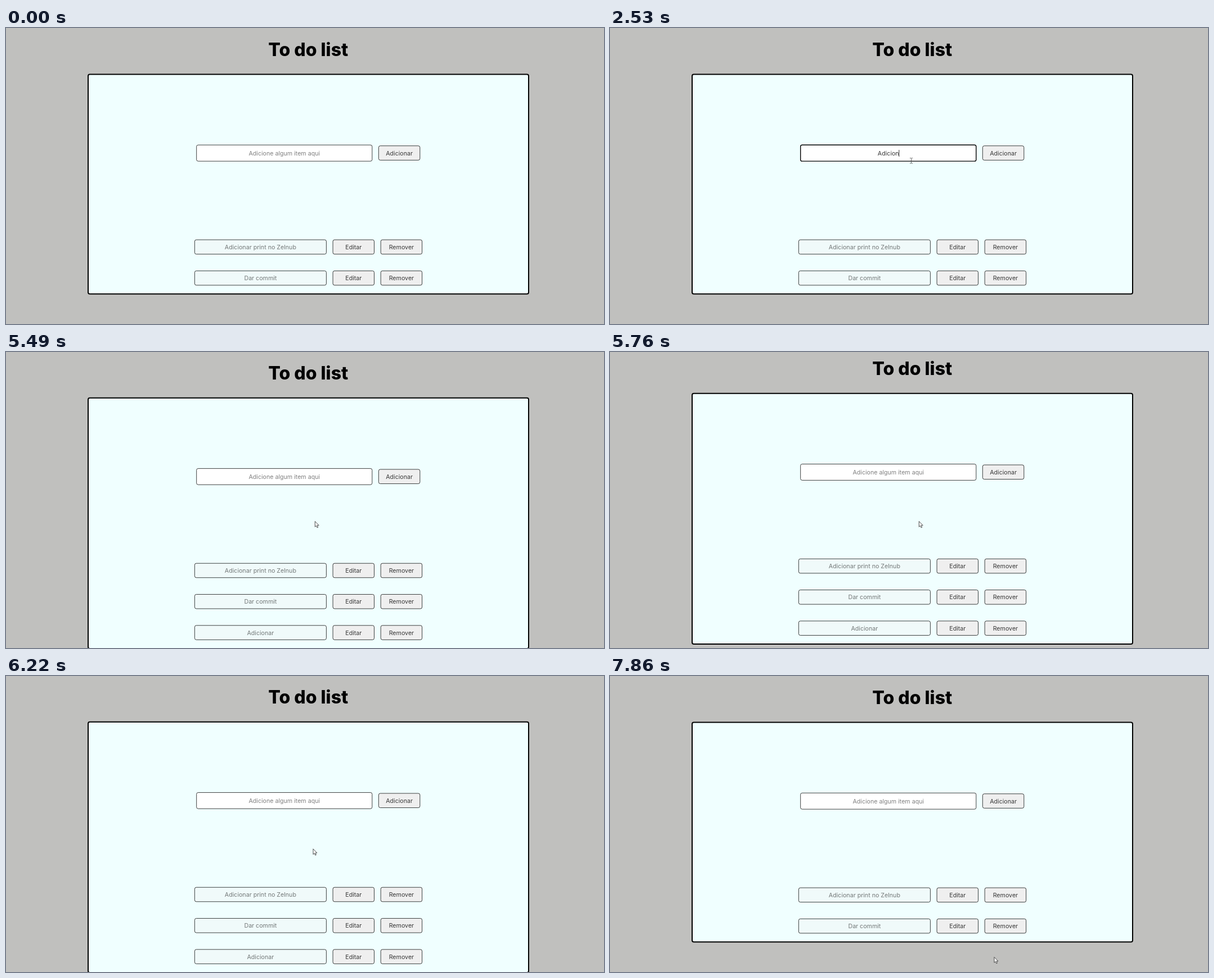
Recreate the animation shown at these times as an HTML page. Size 1063 px wide and 527 px high, loop 8000 ms.

```html
<!DOCTYPE html>
<html lang="pt">
<head>
<meta charset="utf-8">
<title>To do list</title>
<style>
  html, body { margin: 0; width: 100%; height: 100%; overflow: hidden; background: #c0c0be; }
  svg { display: block; width: 100%; height: 100%; }
  text { font: 10.67px Inter, "Open Sans", sans-serif; text-anchor: middle; fill: #383838; }
  #title { font-size: 32px; font-weight: 800; fill: #000; }
  rect { stroke: #000; stroke-width: .75; }
  .panel rect { fill: #f0ffff; stroke-width: 2; }
  .button rect { fill: #efefef; }
  .button.hover rect { fill: #d3d3d3; }
  .item rect { fill: #f0fafa; }
  .item text { fill: #737878; }
  .field rect { fill: #fff; }
  .field.focus rect { stroke-width: 1.4; }
  .field.empty text { fill: #808080; }
</style>
</head>
<body>
<svg>
  <g id="page"><text id="title" x="537.3" y="50">To do list</text></g>
  <g id="pointer">
    <circle id="click" r="9" fill="#f0e628" fill-opacity=".75"/>
    <g fill="#fff" stroke="#222" stroke-width=".8" stroke-linejoin="round">
      <path id="arrow" d="M.3 .5V10.3L2.5 8.3L4.1 11.8L5.7 11.1L4.2 7.7H7.2Z"/>
      <g id="hand">
        <path d="M-1.2 1.6C-1.2 .1 1.1 .1 1.1 1.6V5L5.2 5.9Q6.8 6.4 6.4 8.2L5.4 11.3V13.7H-1V12L-4.4 8.6Q-4.9 6.8 -3 7.1L-1.2 8.5Z"/>
        <path d="M1.1 5V7M3.2 5.6V7.2M5.1 6V7.6" fill="none" stroke-width=".7"/>
      </g>
      <path id="beam" fill="none" stroke="#444" d="M-2.5 -4.5H-1L0 -3.9L1 -4.5H2.5M0 -3.9V4.4M-2.5 5H-1L0 4.4L1 5H2.5"/>
    </g>
  </g>
</svg>
<script>
const LOOP = 8000, PITCH = 55.3;
const $ = id => document.getElementById(id);
const page = $("page");

function add(parent, tag, attrs) {
  const el = document.createElementNS("http://www.w3.org/2000/svg", tag);
  for (const k in attrs) el.setAttribute(k, attrs[k]);
  parent.append(el);
  return el;
}

// bordered box with centred text; the border lies inside x, y, w, h
function box(kind, x, y, w, h, text = "", line = .75) {
  const el = add(page, "g", { class: kind });
  const rect = add(el, "rect", { x: x + line / 2, y: y + line / 2, width: w - line, height: h - line, rx: 3 });
  const label = add(el, "text", { x: x + w / 2, y: y + h / 2 + 4 });
  label.textContent = text;
  return { el, rect, label };
}

const buttons = [];
function button(x, y, text, row = 0) {
  buttons.push({ el: box("button", x, y, 74.2, 26.3, text).el, x, y, row });
}

const panel = box("panel", 145, 81.5, 785, 393, "", 2);
const field = box("field", 338.3, 207.9, 312.9, 29.6);
const caret = add(field.el, "path", { d: "M0 217V229", stroke: "#000", "stroke-width": .8 });
button(662, 209.4, "Adicionar");

const items = ["Adicionar print no Zelnub", "Dar commit", "Adicionar"].map((text, i) => {
  const y = 376.7 + PITCH * i;
  button(580.7, y, "Editar", i);
  button(665.8, y, "Remover", i);
  return box("item", 335, y, 234.8, 26.3, text).el;
});

// pointer path: time, x, y
const path = [
  [240, 924, 516], [740, 535.5, 236], [3100, 535.5, 236], [3930, 678, 231],
  [4560, 678, 231], [4710, 549, 301], [6200, 549, 301], [6320, 530, 337],
  [6440, 498, 385], [6650, 525, 455], [6920, 613, 492], [7120, 660, 497], [7420, 682.7, 500]
];
const word = "Adicionar";
const keys = [1620, 1710, 1910, 2080, 2220, 2380, 2530, 2700, 2760];

const within = (t, a, b) => t >= a && t < b;
const ease = (t, a, b) => {
  const p = Math.min(1, Math.max(0, (t - a) / (b - a)));
  return p * p * (3 - 2 * p);
};
const show = (el, on) => el.setAttribute("visibility", on ? "visible" : "hidden");

function position(t) {
  let i = 0;
  while (i < path.length - 2 && t >= path[i + 1][0]) i++;
  const [a, x, y] = path[i], [b, u, v] = path[i + 1];
  // the last stretch flows through its points without stopping
  const p = a < 6200 ? ease(t, a, b) : Math.min(1, (t - a) / (b - a));
  return [x + (u - x) * p, y + (v - y) * p];
}

function drawField(t) {
  const typed = t < 4170 ? word.slice(0, keys.filter(k => k <= t).length) : "";
  const focus = within(t, 1260, 3980);
  field.label.textContent = typed || "Adicione algum item aqui";
  field.el.classList.toggle("empty", !typed);
  field.el.classList.toggle("focus", focus);
  show(caret, focus && !within(t, 2960, 3460) && t < 3930);
  const half = typed ? field.label.getComputedTextLength() / 2 : 0;
  caret.setAttribute("transform", `translate(${494.9 + half})`);
}

function draw(t) {
  const third = within(t, 4170, 7780);
  const scroll = 10 * (ease(t, 5410, 5860) - ease(t, 5900, 6290));
  page.setAttribute("transform", `translate(0 ${-scroll})`);
  panel.rect.setAttribute("height", 391 + (third ? PITCH : 0));
  show(items[2], third);
  drawField(t);

  const [x, y] = position(t);
  const on = t >= 240;
  const over = (l, top, w, h) => on && within(x, l, l + w) && within(y + scroll, top, top + h);
  let hand = false;
  for (const b of buttons) {
    const there = b.row < 2 || third;
    const hover = there && over(b.x, b.y, 74.2, 26.3);
    show(b.el, there);
    b.el.classList.toggle("hover", hover);
    hand = hand || hover;
  }
  const beam = over(338, 208, 313, 30);
  show($("hand"), on && hand);
  show($("beam"), on && beam);
  show($("arrow"), on && !hand && !beam);
  show($("click"), within(t, 1220, 1460) || within(t, 3980, 4170) || within(t, 7580, 7780));
  $("pointer").setAttribute("transform", `translate(${x} ${y})`);
}

const start = performance.now();
function tick() {
  draw((performance.now() - start) % LOOP);
  requestAnimationFrame(tick);
}
tick();
</script>
</body>
</html>
```
